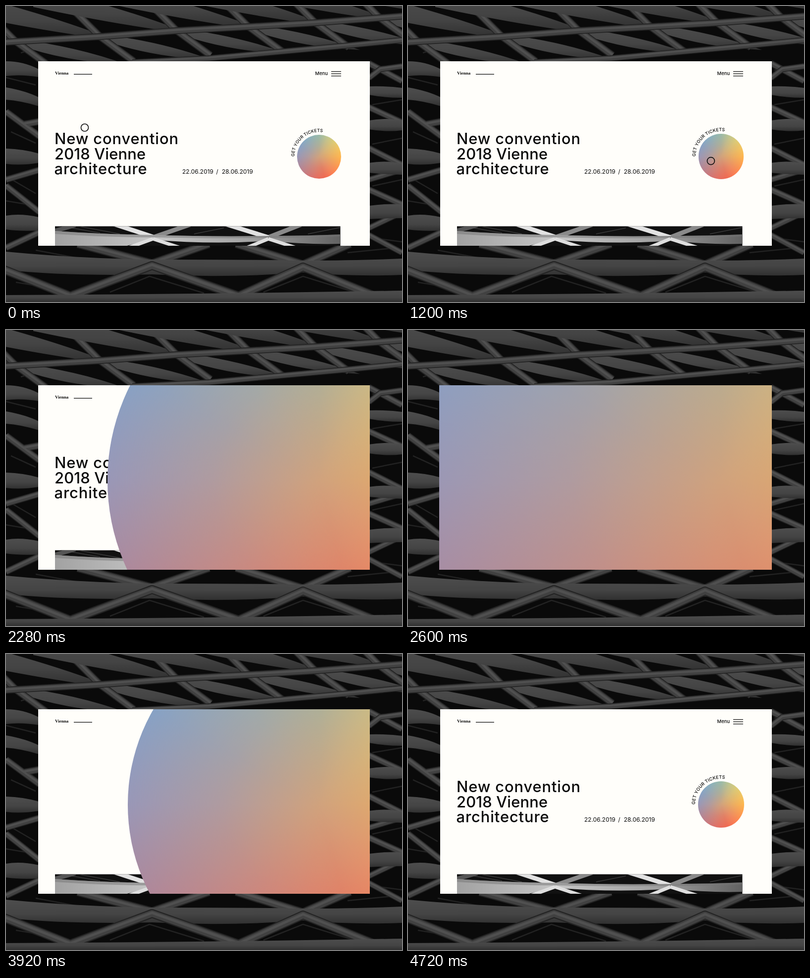
An HTML page that plays this animation: 800 by 600 pixels, repeating every 4880 ms.

```html
<!DOCTYPE html>
<html lang="en">
<head>
<meta charset="utf-8">
<title>Convention page</title>
<style>
  html, body { margin: 0; width: 100%; height: 100%; overflow: hidden; background: #0a0a0a; }
  #stage { position: absolute; left: 0; top: 0; width: 800px; height: 600px; overflow: hidden; }
  svg { position: absolute; left: 0; top: 0; }
  #window { position: absolute; left: 63px; top: 112px; width: 672px; height: 374px; overflow: hidden; }
  #ball {
    position: absolute; border-radius: 50%;
    background:
      radial-gradient(closest-side, rgb(208,162,125), rgba(205,160,128,.43) 50%, rgba(205,160,128,0)),
      conic-gradient(rgb(152,187,170), rgb(196,200,140) 25deg, rgb(222,204,116) 45deg,
        rgb(245,195,92) 70deg, rgb(255,182,78) 90deg, rgb(255,155,78) 115deg,
        rgb(253,128,82) 140deg, rgb(240,105,82) 165deg, rgb(230,108,95) 185deg,
        rgb(203,120,124) 215deg, rgb(173,137,156) 245deg, rgb(153,151,183) 270deg,
        rgb(135,162,197) 300deg, rgb(135,174,194) 325deg, rgb(152,187,170));
  }
  text { font-family: Inter, "Open Sans", sans-serif; fill: #0b0b0b; }
  .title { font-size: 31px; font-weight: 500; letter-spacing: .8px; }
  .date { font-size: 12px; }
  .menu { font-size: 9.5px; font-weight: 500; }
  .brand { font: bold 9px "Liberation Serif", "Noto Serif", serif; }
  .label { font-size: 8.7px; font-weight: 500; letter-spacing: .15px; }
</style>
</head>
<body>
<div id="stage">
  <svg width="800" height="600" viewBox="0 0 800 600">
    <defs>
      <linearGradient id="steel" x1="0" y1="0" x2="0" y2="1">
        <stop offset="0" stop-color="#4d4d4d"/>
        <stop offset=".6" stop-color="#444"/>
        <stop offset="1" stop-color="#303030"/>
      </linearGradient>
      <linearGradient id="bright">
        <stop offset="0" stop-color="#a2a2a2"/>
        <stop offset=".35" stop-color="#c6c6c6"/>
        <stop offset=".7" stop-color="#a0a0a0"/>
        <stop offset="1" stop-color="#626262"/>
      </linearGradient>
      <path id="arc" d="M582.5 305.2A50 50 0 0 1 682.5 305.2"/>
    </defs>
    <rect width="800" height="600" fill="#0a0a0a"/>
    <g id="lattice"></g>

    <rect x="65" y="112" width="670" height="374" fill="#fffefa"/>
    <text class="brand" x="99" y="139">Vienna</text>
    <path d="M137 138.3H174M657 132.8H677M657 137.3H677M657 141.8H677" stroke="#0b0b0b" stroke-width="1.3"/>
    <text class="menu" x="624.5" y="140.3">Menu</text>

    <svg x="99" y="446.500" width="576.500" height="39.500" viewBox="99 446.500 576.500 39.500">
      <rect x="99" y="446" width="577" height="41" fill="#111"/>
      <g fill="none" stroke="#3a3a3a" stroke-width="1.500">
        <path d="M110 446L190 460M380 462L440 450M610 462L675 449M150 447L230 462"/>
      </g>
      <g fill="none" stroke-width="9">
        <path d="M297 469L372 443M530 469L596 443" stroke="#8a8a8a"/>
        <path d="M212 440L297 468M437 440L530 469" stroke="#e2e2e2"/>
        <path d="M99 456L140 444" stroke="#555"/>
      </g>
      <path d="M99 456Q200 463 297 464Q420 468 530 466Q610 466 676 463V482Q610 484 530 476Q420 484 297 474Q270 480 240 487H99Z" fill="url(#bright)"/>
      <path d="M99 456Q200 463 297 464Q420 468 530 466Q610 466 676 463V467Q610 471 530 470Q420 472 297 469Q200 469 99 462Z" fill="#777" opacity=".5"/>
      <path d="M297 472L250 489M297 472L352 490M530 472L486 490M530 472L586 490" stroke="#dedede" stroke-width="7"/>
    </svg>

    <g id="copy">
      <text class="title" x="98" y="280">New convention</text>
      <text class="title" x="98" y="311" style="letter-spacing:.1px">2018 Vienne</text>
      <text class="title" x="97.500" y="340.500">architecture</text>
      <text class="date" x="356" y="340">22.06.2019</text>
      <text class="date" x="424.500" y="340">/</text>
      <text class="date" x="436" y="340">28.06.2019</text>
    </g>
    <g id="label"><text class="label"><textPath href="#arc">GET YOUR TICKETS</textPath></text></g>
  </svg>
  <div id="window"><div id="ball"></div></div>
  <svg width="800" height="600" viewBox="0 0 800 600">
    <circle id="cursor" r="7.500" fill="none" stroke="#111" stroke-width="1.700"/>
  </svg>
</div>
<script>
const LOOP = 4880, STEP = 40;
const CX = 632.5, CY = 305.2;
const REST = 44.5, HOVER = 46.8, FULL = 608;
const $ = id => document.getElementById(id);

// Backdrop: a steel lattice of blades, beams and thin ties.
function drawLattice() {
  let out = '';
  const line = (d, color, w) => {
    out += `<path d="${d}" fill="none" stroke="${color}" stroke-width="${w}" stroke-linejoin="round"/>`;
  };
  const blade = d => { out += `<path d="${d}" fill="url(#steel)"/>`; };
  const beam = (d, w) => {
    line(d, '#242424', w);
    line(d, '#414141', w * .75);
    out += '<g transform="translate(0 -1.5)">';
    line(d, '#505050', w * .28);
    out += '</g>';
  };
  const joints = [[20, 72], [190, 62], [345, 50], [490, 42], [625, 34], [755, 24], [880, 14]];

  // thin ties in the gaps
  const ties = ['M30 95L62 85M0 145L60 160M10 255L60 278M0 345L60 380M0 395L60 405',
    'M740 130L800 118M740 200L800 190M740 280L800 268M740 365L800 352M740 470L800 478',
    'M20 560L110 575M210 580L290 548L400 582M520 580L600 548L710 582M60 495L140 510M690 500L790 490'];
  ties.forEach(d => line(d, '#222', 2.5));

  // upper field, repeated from joint to joint
  for (const [x, y] of joints) {
    blade(`M${x - 290} ${y - 92}Q${x - 110} ${y - 46} ${x} ${y - 4}L${x} ${y + 3}Q${x - 120} ${y - 12} ${x - 290} ${y - 48}Z`);
    blade(`M${x} ${y - 5}Q${x + 120} ${y + 9} ${x + 225} ${y + 47}Q${x + 100} ${y + 42} ${x} ${y + 5}Z`);
    beam(`M${x - 72} ${y - 72}L${x} ${y}`, 15);
    beam(`M${x} ${y}L${x + 68} ${y + 50}`, 15);
  }
  beam('M-10 74L' + joints.map(p => p.join(' ')).join('L'), 14);
  beam('M255 114L410 106L560 92L690 80L800 69', 12);

  // sides
  beam('M0 214L35 240L68 264M35 240L68 234', 14);
  beam('M0 352L68 332M0 364L68 418M0 490L68 458', 13);
  ['M0 112Q35 112 66 128V144Q30 138 0 142Z', 'M0 165Q40 172 66 185V203Q30 192 0 190Z',
   'M0 289Q35 290 66 299V318Q30 324 0 320Z', 'M0 425Q30 420 66 428V455Q30 457 0 453Z'].forEach(blade);
  beam('M733 116L800 152M733 205L800 236M733 288L800 322M733 372L800 402', 13);
  beam('M733 146L756 128L800 122M733 352L800 332M733 450L800 418M733 464L800 500', 12);
  ['M733 163Q770 162 800 166V186Q765 186 733 180Z', 'M733 232Q770 226 800 232V252Q770 256 733 250Z',
   'M733 318Q770 312 800 320V342Q770 342 733 338Z', 'M733 405Q770 400 800 402V430Q770 430 733 432Z'].forEach(blade);

  // lower field
  beam('M145 482L295 522L410 482M465 482L600 524L695 482', 17);
  blade('M0 498Q150 512 295 514Q500 514 600 516Q720 516 800 512V545Q700 549 600 540Q450 552 295 544Q120 548 0 535Z');
  beam('M-10 532L130 588L295 526L470 588L600 529L745 588', 18);
  blade('M0 586Q400 584 800 577V600H0Z');
  $('lattice').innerHTML = out;
}

const clamp = v => Math.min(1, Math.max(0, v));
const mix = (a, b, p) => a + (b - a) * p;

function bezier(x1, y1, x2, y2) {
  const at = (a, b, s) => 3 * (1 - s) * (1 - s) * s * a + 3 * (1 - s) * s * s * b + s * s * s;
  return x => {
    if (x <= 0 || x >= 1) return clamp(x);
    let lo = 0, hi = 1;
    for (let i = 0; i < 24; i++) {
      const mid = (lo + hi) / 2;
      if (at(x1, x2, mid) < x) lo = mid; else hi = mid;
    }
    return at(y1, y2, lo);
  };
}
const glide = bezier(.25, .1, .25, 1);
const swell = bezier(.48, 0, .3, 1);
const span = (t, from, to, ease) => ease(clamp((t - from) / (to - from)));

function radius(t) {
  if (t < 1900) return mix(REST, HOVER, span(t, 940, 1640, glide));
  if (t < 3700) return mix(HOVER, FULL, span(t, 1900, 2660, swell));
  return mix(FULL, HOVER, span(t, 3740, 4220, swell));
}

function render(t) {
  const r = radius(t);
  const ball = $('ball').style;
  ball.width = ball.height = 2 * r + 'px';
  ball.left = CX - r - 63 + 'px';
  ball.top = CY - r - 112 + 'px';

  const k = Math.min(r, HOVER) / REST;
  $('label').setAttribute('transform', `translate(${CX} ${CY}) scale(${k}) translate(${-CX} ${-CY})`);

  const move = span(t, 0, 1440, glide);
  const cursor = $('cursor');
  cursor.setAttribute('cx', mix(159, 619.5, move));
  cursor.setAttribute('cy', mix(246.5, 315.2, move));
  cursor.setAttribute('opacity', 1 - clamp((t - 1920) / 120));

  const shown = t < 3000 ? 1 : span(t, 4290, 4720, glide);
  $('copy').setAttribute('opacity', shown);
  $('copy').setAttribute('transform', `translate(0 ${5 * (1 - shown)})`);
}

drawLattice();
const start = performance.now();
function tick() {
  const t = (performance.now() - start) % LOOP;
  render(Math.floor(t / STEP) * STEP);
  requestAnimationFrame(tick);
}
render(0);
requestAnimationFrame(tick);
</script>
</body>
</html>
```
